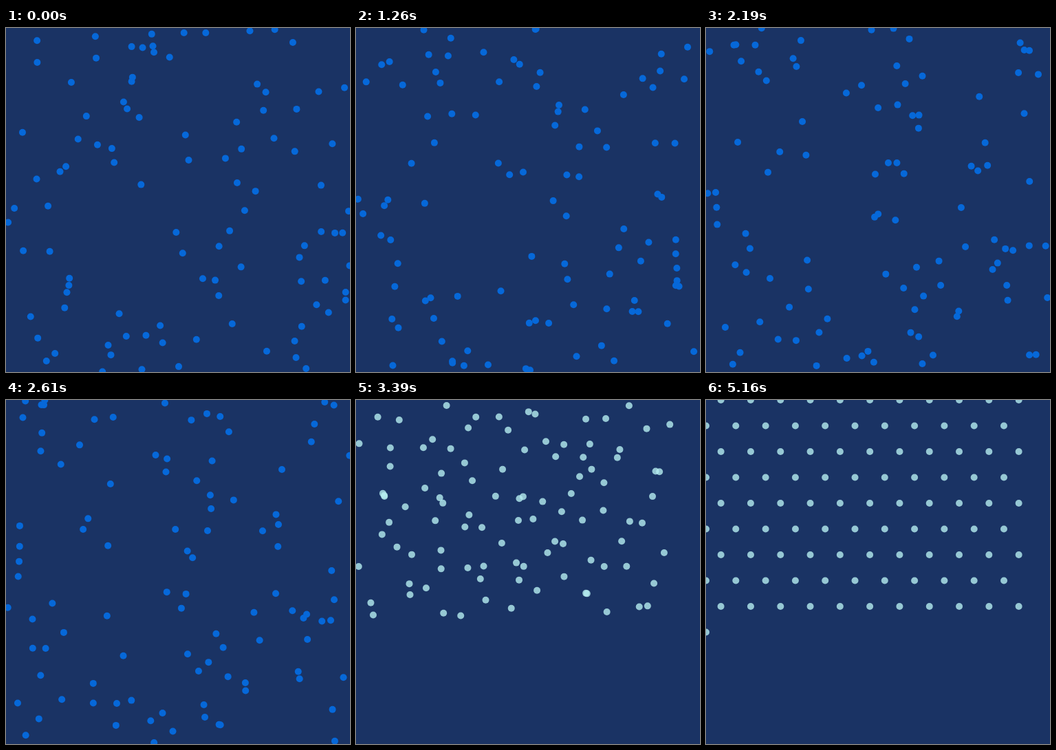
Recreate the animation shown at these times as an HTML page with a canvas. Size 500x500 px, loop 5.4 s.

```html
<!DOCTYPE html>
<html lang="en">
<head>
<meta charset="utf-8">
<title>Gas to crystal</title>
<style>
  html, body { margin: 0; width: 100%; height: 100%; overflow: hidden; background: #1a3364; }
  canvas { display: block; width: 100vw; height: 100vh; }
</style>
</head>
<body>
<canvas width="500" height="500"></canvas>
<script>
const SIZE = 500, COUNT = 100, RADIUS = 5;
const FRAME_MS = 30, LOOP_FRAMES = 180;
const LAST_GAS_FRAME = 89;
const MAX_SPEED = 2;          // px per frame on each axis
const PULL = 0.1;             // share of the remaining distance closed per frame
const COLUMNS = 11, BOND = 25;
const BACKGROUND = '#1a3364', GAS = '#0668d9', CRYSTAL = 'rgba(181, 237, 240, 0.8)';

const ctx = document.querySelector('canvas').getContext('2d');

let seed = 20717;
function random() {
  seed = (seed + 0x6d2b79f5) | 0;
  let n = Math.imul(seed ^ (seed >>> 15), seed | 1);
  n ^= n + Math.imul(n ^ (n >>> 7), n | 61);
  return ((n ^ (n >>> 14)) >>> 0) / 2 ** 32;
}

const randomSpeed = () => (random() * 2 - 1) * MAX_SPEED;

const particles = Array.from({ length: COUNT }, (_, i) => {
  const row = Math.floor(i / COLUMNS), column = i % COLUMNS;
  const shift = row % 2 ? 0 : 0.5;
  return {
    x: random() * SIZE, y: random() * SIZE,
    vx: randomSpeed(), vy: randomSpeed(),
    siteX: (column + shift) * BOND * Math.sqrt(3),
    siteY: row * BOND * 1.5
  };
});

// Straight travel reflected between the walls at 0 and SIZE.
function bounce(position) {
  const p = ((position % (2 * SIZE)) + 2 * SIZE) % (2 * SIZE);
  return p > SIZE ? 2 * SIZE - p : p;
}

function draw(frame) {
  const gasFrame = Math.min(frame, LAST_GAS_FRAME);
  const remaining = (1 - PULL) ** (frame - gasFrame);
  const settle = (from, site) => site + (from - site) * remaining;

  ctx.fillStyle = BACKGROUND;
  ctx.fillRect(0, 0, SIZE, SIZE);
  ctx.fillStyle = frame > LAST_GAS_FRAME ? CRYSTAL : GAS;
  for (const p of particles) {
    const x = settle(bounce(p.x + p.vx * gasFrame), p.siteX);
    const y = settle(bounce(p.y + p.vy * gasFrame), p.siteY);
    ctx.beginPath();
    ctx.arc(x, y, RADIUS, 0, 2 * Math.PI);
    ctx.fill();
  }
}

const start = performance.now();
function tick() {
  const elapsed = performance.now() - start;
  draw(Math.floor(elapsed / FRAME_MS) % LOOP_FRAMES);
  requestAnimationFrame(tick);
}
tick();
</script>
</body>
</html>
```
